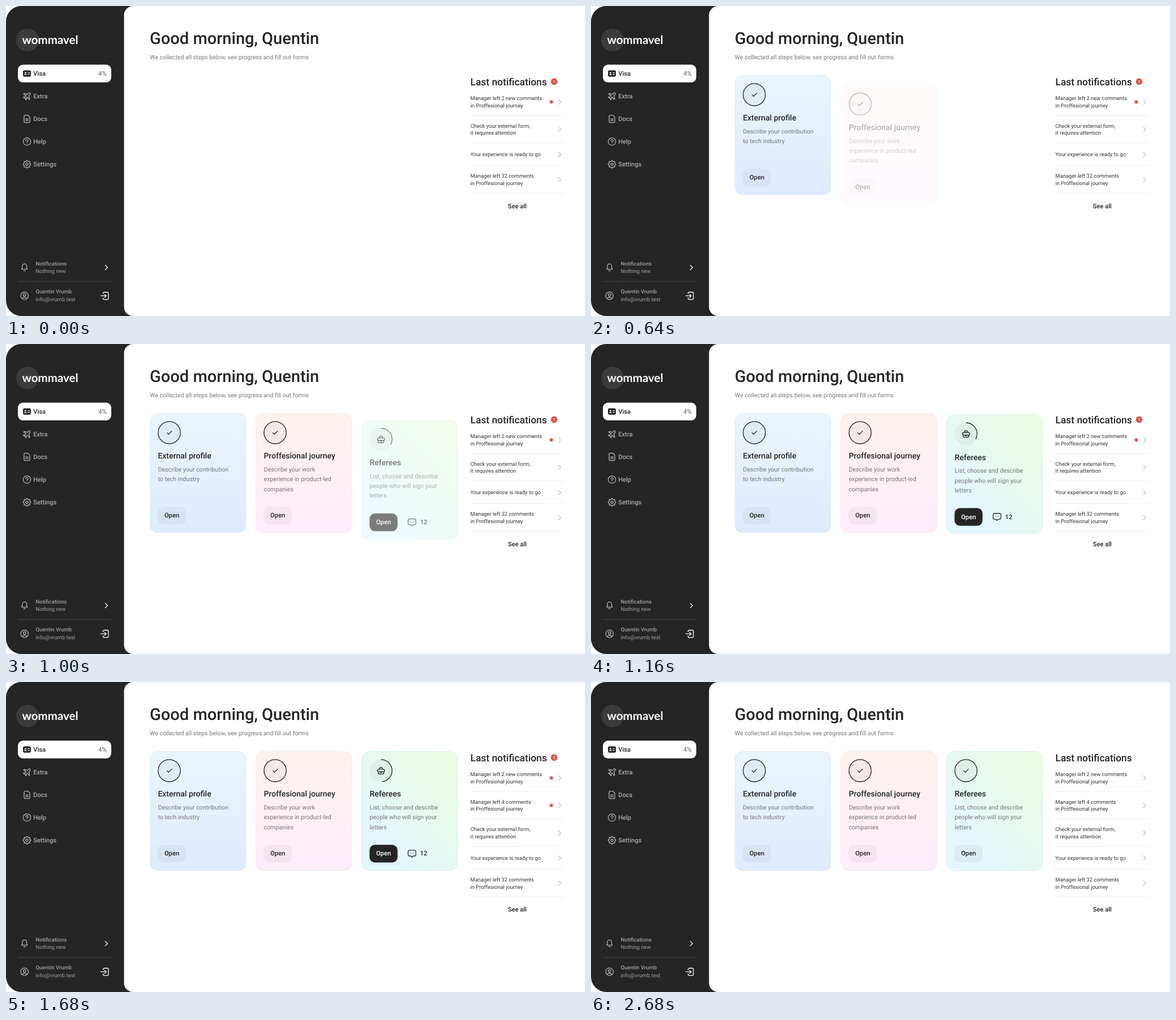
An HTML page for the animation above (3.88 s loop, 1023 px wide and 547 px high).

```html
<!DOCTYPE html>
<html lang="en">
<head>
<meta charset="utf-8">
<title>Dashboard</title>
<style>
  html, body { margin: 0; width: 100%; height: 100%; overflow: hidden; background: #fff; }
  svg { display: block; width: 100vw; height: 100vh; }
  text { font-family: Roboto, "Open Sans", sans-serif; fill: #252525; text-rendering: geometricPrecision; white-space: pre; }
  .bold { font-weight: 500; }
  .mid { text-anchor: middle; }
  .title { font-size: 29px; }
  .lead { font-size: 10.6px; fill: #767676; }
  .nav { font-size: 11.1px; fill: #aaa; }
  .small { font-size: 9.5px; fill: #a0a0a0; }
  .head { font-size: 14px; }
  .desc { font-size: 10.7px; fill: #777; }
  .btn { font-size: 11.2px; }
  .note { font-size: 9.35px; fill: #333; }
  .line { fill: none; stroke: #b4b4b4; stroke-width: 1.3; stroke-linecap: round; stroke-linejoin: round; }
  .dark { stroke: #252525; }
  .white { stroke: #fff; }
  .arrow { fill: none; stroke: #bcbcbc; stroke-width: 1.2; stroke-linecap: round; stroke-linejoin: round; }
  .rule { stroke: #f0f0f0; }
  .alert { fill: #d9564a; }
</style>
</head>
<body>
<svg id="stage" viewBox="0 0 1023 547" xmlns="http://www.w3.org/2000/svg"></svg>
<script>
const LOOP = 3880, STEP = 40;
const stage = document.getElementById('stage');

const text = (x, y, cls, str, extra = '') => `<text x="${x}" y="${y}" class="${cls}" ${extra}>${str}</text>`;
const at = (x, y, body, id = '') => `<g ${id && `id="${id}"`} transform="translate(${x} ${y})">${body}</g>`;
const line = (d, cls = '') => `<path class="line ${cls}" d="${d}"/>`;
const ring = (r, cls = '') => `<circle class="line ${cls}" r="${r}"/>`;

function gearPath() {
  let d = '';
  for (let i = 0; i < 32; i++) {
    const a = (i - 0.5) * Math.PI / 16;
    const r = i % 4 < 2 ? 6.7 : 5.3;
    d += `${i ? 'L' : 'M'}${(r * Math.cos(a)).toFixed(2)} ${(r * Math.sin(a)).toFixed(2)}`;
  }
  return d + 'Z';
}

const icons = {
  plane: line('M5.6-5.6C4.8-6.4 3.6-6 2.8-5.2L1-3.4L-4.6-5L-5.8-3.8L-1.6-.8L-3.6 1.4L-5.4 1.2L-6.3 2.1L-3.4 3.4L-2.1 6.3L-1.2 5.4L-1.4 3.6L.8 1.6L3.8 5.8L5 4.6L3.4-1L5.2-2.8C6-3.6 6.4-4.8 5.6-5.6Z'),
  doc: line('M1.8-6.5H-3A2 2 0 0 0-5-4.5V4.5A2 2 0 0 0-3 6.5H3A2 2 0 0 0 5 4.5V-3.3ZM-2.3.3H2.3M-2.3 3.2H2.3'),
  help: ring(6.6) + line('M-2-1.5A2 2 0 1 1 .9.2Q0 .7 0 1.5M0 3.6v.1'),
  gear: ring(2.1) + line(gearPath()),
  card: '<rect x="-7" y="-5.6" width="14" height="11.2" rx="2.8" fill="#252525"/><circle cx="-2.6" cy="-1.3" r="1.4" fill="#fff"/><path d="M-5 2.6Q-5 .8-2.6.8T-.2 2.6Z" fill="#fff"/>' +
    line('M2-1.5H4.4M2 1.4H4.4', 'white'),
  bell: line('M-5 3.5C-3.8 2.4-3.8 1-3.8-1.8A3.8 3.8 0 0 1 3.8-1.8C3.8 1 3.8 2.4 5 3.5ZM-1.6 6Q0 7.2 1.6 6'),
  user: ring(6.7) + '<circle class="line" cy="-1.5" r="2.2"/>' + line('M-4.2 5C-3 2 3 2 4.2 5'),
  exit: line('M-3-3.6V-4.4A2 2 0 0 1-1-6.4H4.4A2 2 0 0 1 6.4-4.4V4.4A2 2 0 0 1 4.4 6.4H-1A2 2 0 0 1-3 4.4V3.6M-7 0H2.6M-.2-2.8L2.6 0L-.2 2.8', 'white'),
  check: line('M-4 .2L-1.3 3L4.4-2.8', 'dark'),
  bag: line('M-3-2.6H3Q6.4-2.6 6.4 0T3 2H-3Q-6.4 2-6.4 0T-3-2.6ZM-2.8-2.8Q-2.8-5.8 0-5.8T2.8-2.8M-5 2V4Q-5 6-3 6H3Q5 6 5 4V2M-1.6 2V3.2H1.6V2', 'dark'),
  chat: line('M-4.6-5.8H4.6Q6.8-5.8 6.8-3.6V2.2Q6.8 4.4 4.6 4.4H2L0 6.6L-2 4.4H-4.6Q-6.8 4.4-6.8 2.2V-3.6Q-6.8-5.8-4.6-5.8ZM-3-.7h.1M0-.7h.1M3-.7h.1', 'dark')
};

function sidebar() {
  const items = [['Extra', 'plane'], ['Docs', 'doc'], ['Help', 'help'], ['Settings', 'gear']];
  return '<path d="M27 0H240V547H27A27 27 0 0 1 0 520V27A27 27 0 0 1 27 0Z" fill="#252525"/>' +
    '<rect x="208.5" width="840" height="547" rx="16" fill="#fff"/>' +
    '<circle cx="38" cy="60" r="20" fill="#3b3b3b"/>' +
    text(28.5, 67, '', 'wommavel', 'style="font:700 20.5px Lato,sans-serif;fill:#fff"') +
    '<rect x="21" y="103.5" width="165" height="31.3" rx="9" fill="#fff"/>' +
    at(37, 119.2, icons.card) + text(48.2, 123.1, 'btn bold', 'Visa') +
    text(178, 123.1, '', '4%', 'style="font-size:11.5px;fill:#666;text-anchor:end"') +
    items.map(([name, icon], i) => at(37, 159.2 + 40 * i, icons[icon]) + text(48.2, 163.1 + 40 * i, 'nav bold', name)).join('') +
    at(32.7, 460.8, icons.bell) + text(52.5, 458.2, 'small bold', 'Notifications') + text(52.5, 471, 'small', 'Nothing new') +
    line('M175.3 457.4L179.5 461.5L175.3 465.6', 'white') +
    '<path d="M21 486H186" stroke="#444"/>' +
    at(32.7, 511.4, icons.user) + text(52.5, 507.4, 'small bold', 'Quentin Vrumb') + text(52.5, 521.3, 'small', 'info@vrumb.test') +
    at(174.5, 511.4, icons.exit);
}

const button = (fill, ink, id = '') => `<g ${id && `id="${id}"`}><rect x="14.3" y="165" width="49.5" height="31.3" rx="9.5" fill="${fill}"/>` +
  text(39, 184.2, 'btn bold mid', 'Open', `style="fill:${ink}"`) + '</g>';

function card(i, name, lines, edge, icon, extra) {
  const disc = '<circle r="20" fill="#000" fill-opacity=".04"/>' +
    `<circle class="line dark" ${i === 2 ? 'id="arc"' : ''} r="19.6" pathLength="1" transform="rotate(-90)" style="stroke-linecap:butt"/>`;
  return at(254 + 187 * i, 122.2,
    `<rect x=".4" y=".4" width="169.4" height="210.2" rx="13" fill="url(#fill${i})" stroke="${edge}" stroke-width=".8"/>` +
    at(34.5, 34.2, disc + icon) +
    text(14.4, 80.2, 'head bold', name) +
    lines.map((s, k) => text(14.4, 103 + 17.2 * k, 'desc', s)).join('') + extra, 'card' + i);
}

function cards() {
  const pale = button('rgba(30,30,30,.045)', '#252525');
  return card(0, 'External profile', ['Describe your contribution', 'to tech industry'], '#dce9f6', icons.check, pale) +
    card(1, 'Proffesional journey', ['Describe your work', 'experience in product-led', 'companies'], '#f8e2e7', icons.check, pale) +
    card(2, 'Referees', ['List, choose and describe', 'people who will sign your', 'letters'], '#d8f0ea',
      `<g class="todo">${icons.bag}</g><g class="done">${icons.check}</g>`,
      `<g class="done">${pale}</g><g class="todo">` + button('#252525', '#fff') +
      at(89.3, 180.4, icons.chat) + text(103.6, 184.2, 'btn bold', '12') + '</g>');
}

// A row is placed by its centre; the rule below it sits at its own distance.
function row(y, lines, gap, dot) {
  const first = lines.length > 1 ? -3.3 : 3.3;
  return lines.map((s, i) => text(820.5, y + first + 12.9 * i, 'note', s)).join('') +
    (dot ? `<circle class="alert todo" cx="963.5" cy="${y}" r="3"/>` : '') +
    `<path class="arrow" d="M976.2 ${y - 4}l4 4l-4 4"/><path class="rule" d="M820.5 ${y + gap}H985"/>`;
}

function notices() {
  const journey = 'in Proffesional journey';
  return text(820.5, 139.6, 'bold', 'Last notifications', 'style="font-size:17.4px"') +
    '<g class="todo"><circle class="alert" cx="968.5" cy="133.4" r="5.8"/>' +
    text(968.5, 136, 'bold mid', '1', 'id="count" style="font-size:7.2px;fill:#fff"') + '</g>' +
    row(169.3, ['Manager left 2 new comments', journey], 24, true) +
    `<g id="fresh">${row(217.8, ['Manager left 4 comments', journey], 23.6, true)}</g>` +
    '<g id="older">' +
    row(217.8, ['Check your external form,', 'it requires attention'], 23.6) +
    row(262, ['Your experience is ready to go'], 19.4) +
    row(306.4, ['Manager left 32 comments', journey], 23.8) +
    text(903.3, 356.6, 'bold mid', 'See all', 'style="font-size:11.1px"') + '</g>';
}

const fill = (i, axis, a, b) => `<linearGradient id="fill${i}" ${axis}><stop stop-color="${a}"/><stop offset="1" stop-color="${b}"/></linearGradient>`;
stage.innerHTML = '<defs>' +
  fill(0, 'x2="0" y2="1"', '#ebf5fb', '#dfeaff') +
  fill(1, 'x2="0" y2="1"', '#fdf2ef', '#fdeefa') +
  fill(2, 'x1="1" y1="0" x2=".25" y2=".8"', '#ecfbe1', '#e4f7fb') + '</defs>' +
  sidebar() +
  text(254, 66.8, 'title bold', 'Good morning, Quentin') +
  text(254, 94.3, 'lead', 'We collected all steps below, see progress and fill out forms') +
  cards() + notices();

const $ = id => document.getElementById(id);
const part = (t, from, to) => Math.min(1, Math.max(0, (t - from) / (to - from)));
const easeOut = (u, n) => 1 - (1 - u) ** n;
const easeInOut = u => (1 - Math.cos(Math.PI * u)) / 2;
const fade = (el, v) => el.setAttribute('opacity', v);

const cardStarts = [248, 573, 881];
const cardEls = cardStarts.map((_, i) => $('card' + i));
const todo = stage.querySelectorAll('.todo');
const done = stage.querySelectorAll('.done');
const arc = $('arc'), fresh = $('fresh'), older = $('older'), count = $('count');

function draw(t) {
  cardEls.forEach((el, i) => {
    const s = cardStarts[i];
    const drop = 24 * (1 - easeOut(part(t, s, s + 400), 2));
    el.setAttribute('transform', `translate(${254 + 187 * i} ${122.2 + drop})`);
    fade(el, part(t, s, s + 200));
  });

  const p = 0.33 + 0.67 * easeInOut(part(t, 1280, 2540));
  arc.setAttribute('stroke-dasharray', p < 1 ? `${p} 2` : 'none');

  older.setAttribute('transform', `translate(0 ${48.7 * easeOut(part(t, 1200, 1440), 3)})`);
  fade(fresh, part(t, 1220, 1420));
  count.textContent = t < 1280 ? '1' : '2';

  const end = easeInOut(part(t, 2360, 2680));
  todo.forEach(el => fade(el, 1 - end));
  done.forEach(el => fade(el, end));
}

const start = performance.now();
function tick() {
  const t = (performance.now() - start) % LOOP;
  draw(Math.floor(t / STEP) * STEP);
  requestAnimationFrame(tick);
}
tick();
</script>
</body>
</html>
```
